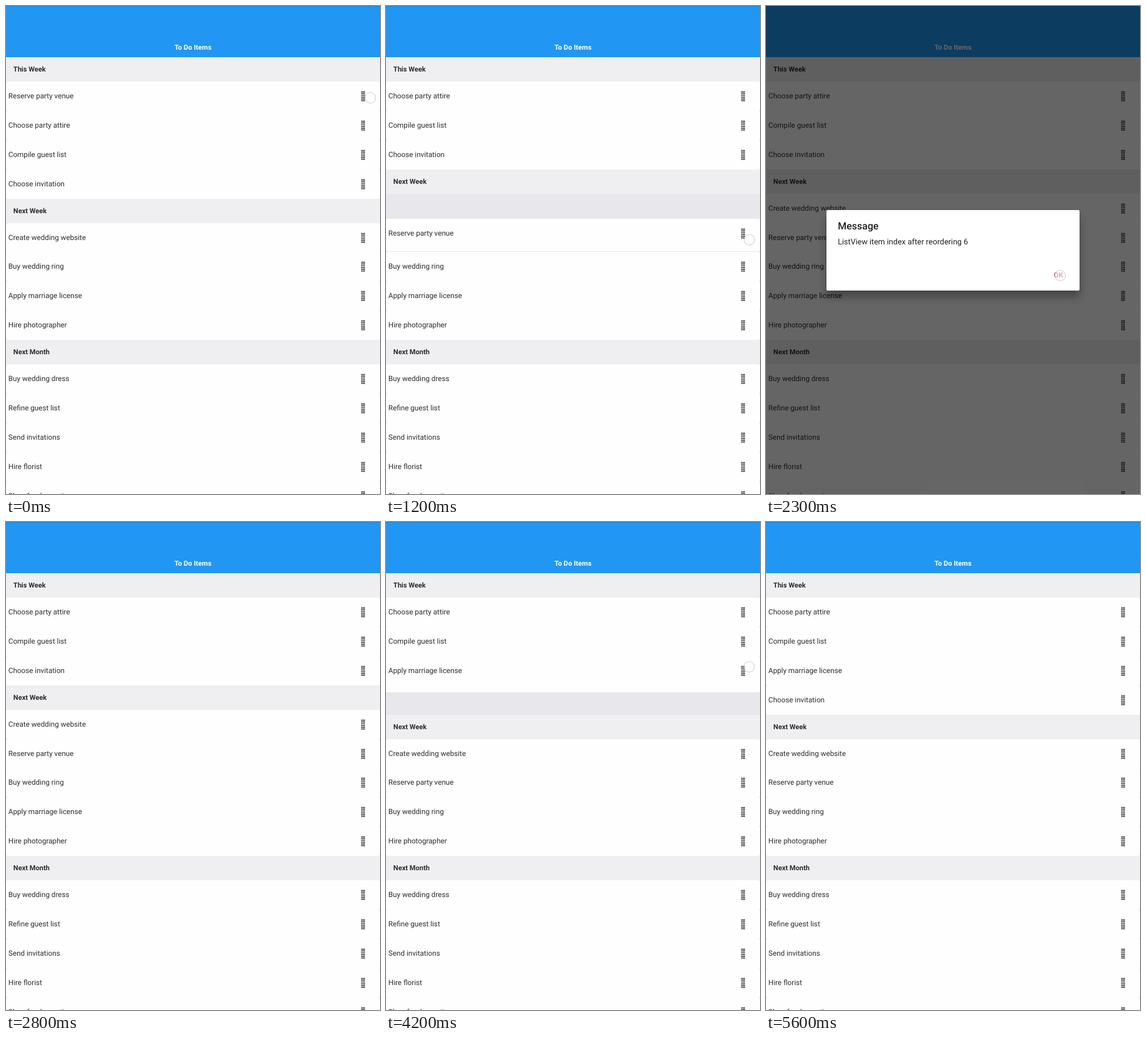
These frames come from a looping animation (600 by 782 pixels, 5.7 s). An HTML page:

```html
<!DOCTYPE html>
<html lang="en">
<head>
<meta charset="utf-8">
<title>To Do Items</title>
<style>
  html, body { margin: 0; width: 100%; height: 100%; overflow: hidden; }
  #stage {
    position: relative; width: 600px; height: 782px; overflow: hidden;
    background: #e8e7eb; color: #2e2e2e; font-family: Roboto, sans-serif;
    text-rendering: geometricPrecision;
  }
  #stage div { position: absolute; box-sizing: border-box; white-space: nowrap; }
  .bar {
    left: 0; top: 0; width: 600px; height: 82px; z-index: 3;
    background: #2196f3; border-top: 1px solid #1b85da; color: #fff;
    font-size: 11.1px; font-weight: 700; line-height: 131px; text-align: center;
  }
  .row, .head { left: 0; width: 600px; }
  .row {
    height: 47px; padding-left: 3.8px; background: #fefefe; border-radius: 3px;
    font-size: 11.7px; line-height: 47px;
  }
  .head {
    height: 39px; padding-left: 11.8px; background: #efeef0;
    font-size: 11.1px; font-weight: 700; line-height: 39px;
  }
  .lifted { z-index: 1; }
  .grip {
    position: absolute; left: 569px; top: 15px; width: 8px; height: 17px;
    fill: none; stroke: #111; stroke-width: 1.6; stroke-dasharray: 1.7 1.1;
  }
  #shade { inset: 0; z-index: 4; background: rgba(0, 0, 0, .6); }
  #dialog {
    left: 97px; top: 327px; width: 406px; height: 128.5px; z-index: 5;
    background: #fff; border-radius: 2px; color: #212121;
    box-shadow: 0 10px 14px rgba(0, 0, 0, .32);
  }
  .title { left: 18.2px; top: 16px; font-size: 16px; font-weight: 500; line-height: 20px; }
  #message { left: 18.2px; top: 42px; font-size: 12.6px; line-height: 19px; }
  .ok { left: 364.5px; top: 96px; font-size: 11.5px; font-weight: 700; line-height: 17px; color: #df5f92; }
  #touch {
    left: -9px; top: -9px; width: 18px; height: 18px; z-index: 6; border-radius: 50%;
    background: rgba(255, 255, 255, .45); border: 1px solid rgba(150, 140, 145, .45);
  }
</style>
</head>
<body>
<div id="stage">
  <div class="bar">To Do Items</div>
  <div id="shade"></div>
  <div id="dialog">
    <div class="title">Message</div>
    <div id="message"></div>
    <div class="ok">OK</div>
  </div>
  <div id="touch"></div>
</div>
<script>
  const LOOP = 5700, STEP = 100, ROW = 46.875, HEAD = 39;
  const GRIP = '<svg class="grip"><path d="M1.6 .8v15.7M3.8 .8v15.7M6 .8v15.7"/></svg>';
  const $ = id => document.getElementById(id);
  const stage = $('stage');

  // Linear value of a track of [time, value] points
  function at(track, t) {
    const i = track.findIndex(p => p[0] > t);
    if (i < 0) return track[track.length - 1][1];
    if (i === 0) return track[0][1];
    const [t0, a] = track[i - 1], [t1, b] = track[i];
    return a + (b - a) * (t - t0) / (t1 - t0);
  }

  const slide = (t, from, to) => [[t, from], [t + 150, to]];
  const upAt = t => slide(t, 0, -ROW);
  const upAndBack = (t, back) => [...upAt(t), ...slide(back, -ROW, 0)];

  // Offsets of each line from its first place; lifted lines follow the finger
  const landed = 4 * ROW + HEAD;
  const reserveMove = [
    [250, 0], [1200, 219.6], [1400, 234], [1550, landed],
    ...slide(3750, landed, landed + ROW)
  ];
  const applyMove = [
    [3450, 0], [4170, -226], [4200, -226.5], [4300, -238], [4450, -landed]
  ];

  const lines = [
    ['This Week', 'head'],
    ['Reserve party venue', 'row lifted', reserveMove],
    ['Choose party attire', 'row', upAt(454)],
    ['Compile guest list', 'row', upAt(658)],
    ['Choose invitation', 'row', upAndBack(862, 4165)],
    ['Next Week', 'head', upAndBack(1000, 4020)],
    ['Create wedding website', 'row', upAndBack(1195, 3899)],
    ['Buy wedding ring', 'row', slide(3598, 0, ROW)],
    ['Apply marriage license', 'row lifted', applyMove],
    ['Hire photographer', 'row'],
    ['Next Month', 'head'],
    ['Buy wedding dress', 'row'],
    ['Refine guest list', 'row'],
    ['Send invitations', 'row'],
    ['Hire florist', 'row'],
    ['Shop for decorations', 'row']
  ];

  let nextTop = 82;
  const items = lines.map(([text, kind, move = [[0, 0]]]) => {
    const el = document.createElement('div');
    const isHead = kind === 'head';
    el.className = kind;
    el.textContent = text;
    if (!isHead) el.insertAdjacentHTML('beforeend', GRIP);
    stage.append(el);
    const top = nextTop;
    nextTop += isHead ? HEAD : ROW;
    return { el, top, move };
  });

  const dialogFade = [
    [1600, 0], [1800, 1], [2400, 1], [2600, 0],
    [4500, 0], [4700, 1], [5250, 1], [5400, 0]
  ];

  // Touches: start, end, x track, y track
  const touches = [
    [0, 1500, [[0, 584.5], [1200, 583]], [[200, 147], [1200, 374.5], [1400, 389]]],
    [2200, 2450, [[0, 472]], [[0, 432]]],
    [3200, 4400, [[0, 582.5]], [[3400, 465], [4200, 232], [4300, 220]]],
    [5100, 5300, [[0, 472]], [[0, 432]]]
  ];

  function draw(t) {
    for (const { el, top, move } of items)
      el.style.top = Math.round(top + at(move, t)) + 'px';

    const fade = at(dialogFade, t);
    $('shade').style.opacity = $('dialog').style.opacity = fade;
    $('dialog').style.transform = `scale(${0.94 + 0.06 * fade})`;
    $('message').textContent = 'ListView item index after reordering ' + (t < 3000 ? 6 : 3);

    const touch = touches.find(([from, to]) => t >= from && t < to);
    $('touch').style.display = touch ? 'block' : 'none';
    if (touch)
      $('touch').style.transform = `translate(${at(touch[2], t)}px, ${at(touch[3], t)}px)`;
  }

  // The screen refreshes ten times a second
  const start = performance.now();
  function tick() {
    const t = (performance.now() - start + 8) % LOOP;
    draw(Math.floor(t / STEP) * STEP);
    requestAnimationFrame(tick);
  }
  tick();
</script>
</body>
</html>
```
